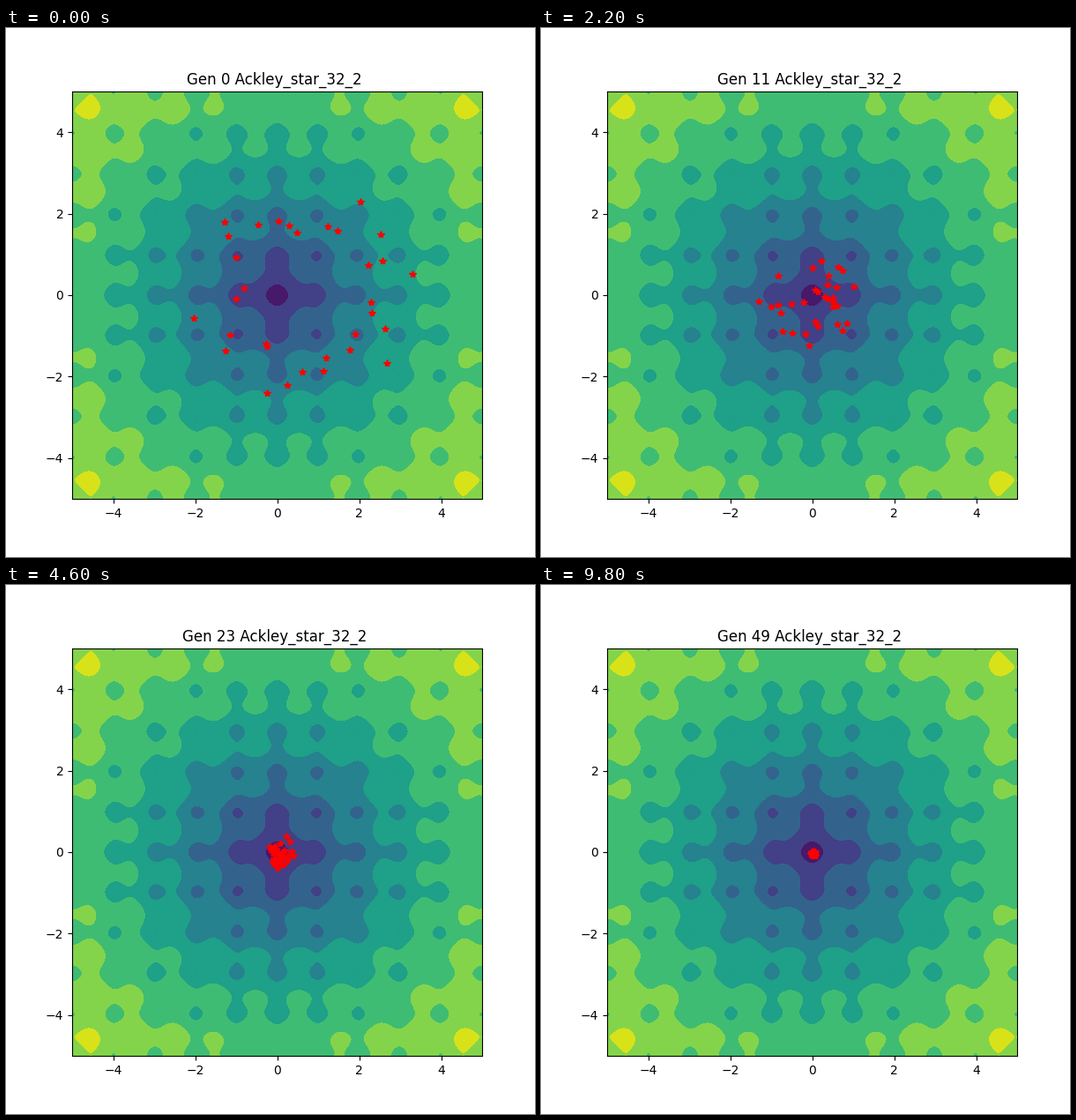
Recreate the animation shown at these times as a matplotlib script. Size 600 px wide and 600 px high, loop 10000 ms.

```python
import numpy as np
import matplotlib.pyplot as plt
from matplotlib.animation import FuncAnimation

COUNT, GENS = 32, 50
rng = np.random.default_rng(11)

# Each particle starts on a ring and oscillates between that and a scattered spot
angle = np.arange(COUNT) * 2 * np.pi / COUNT + rng.uniform(-.15, .15, COUNT)
radius = rng.uniform(.7, 1.3, COUNT)
ring = np.column_stack([np.cos(angle), np.sin(angle)]) * radius[:, None]
scatter = rng.normal(0, .7, (COUNT, 2))
speed = rng.uniform(.25, .9, (COUNT, 1))

# Drift of the swarm's centre: generation, x, y
DRIFT_GEN = [0, 7, 15, 23, 31, 49]
DRIFT_X = [.70, .30, -.28, .06, .03, .03]
DRIFT_Y = [0, -.20, .10, -.13, 0, -.03]


def ackley(x, y):
    bowl = -20 * np.exp(-.2 * np.sqrt((x**2 + y**2) / 2))
    waves = -np.exp((np.cos(2 * np.pi * x) + np.cos(2 * np.pi * y)) / 2)
    return bowl + waves + 20 + np.e


def positions(gen):
    centre = [np.interp(gen, DRIFT_GEN, drift) for drift in (DRIFT_X, DRIFT_Y)]
    spread = 2.1 * np.exp(-(gen / 12) ** 1.2) + .04
    swing = ring * np.cos(speed * gen) + scatter * np.sin(speed * gen)
    return centre + spread * swing


fig, ax = plt.subplots(figsize=(6, 6), dpi=100)
axis = np.linspace(-5, 5, 200)
X, Y = np.meshgrid(axis, axis)
ax.contourf(X, Y, ackley(X, Y))
stars, = ax.plot([], [], "r*")
ax.set_xlim(-5, 5)
ax.set_ylim(-5, 5)


def update(gen):
    stars.set_data(*positions(gen).T)
    ax.set_title(f"Gen {gen} Ackley_star_32_2", x=.494)
    return stars,


anim = FuncAnimation(fig, update, frames=GENS, interval=200,
                     repeat=True, repeat_delay=0)
plt.show()
```
